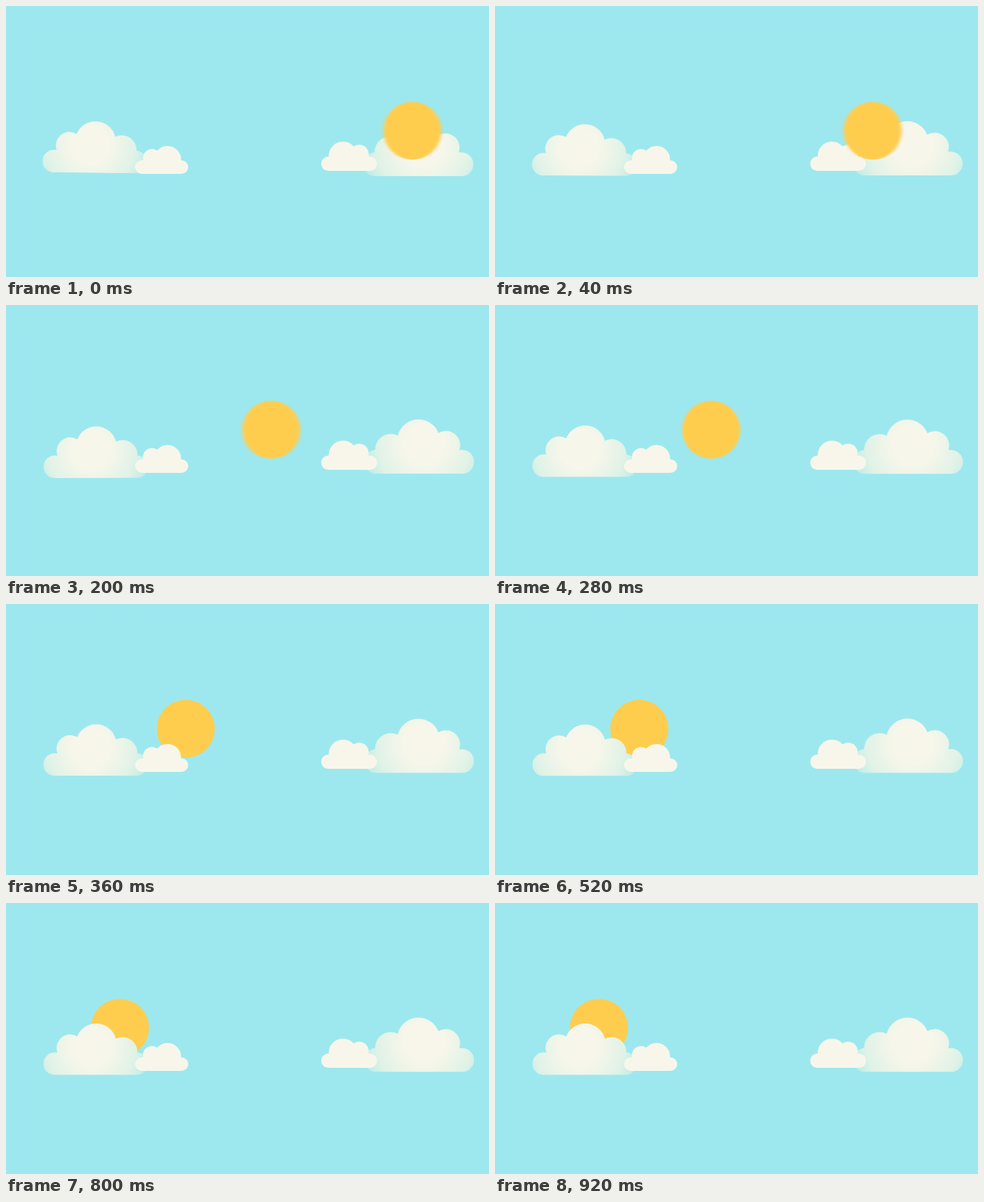
Write an HTML page that moves like this. It is 640 px wide and 360 px high and loops after 960 ms.

```html
<!DOCTYPE html>
<html lang="en">
<head>
<meta charset="utf-8">
<title>Sun and clouds</title>
<style>
  html, body { margin: 0; width: 100%; height: 100%; overflow: hidden; background: #9de8ee; }
  svg { display: block; width: 100%; height: 100%; }
</style>
</head>
<body>
<svg viewBox="0 0 640 360">
  <defs>
    <radialGradient id="puff" gradientUnits="userSpaceOnUse" cx="-7" cy="-37" r="85">
      <stop offset="0" stop-color="#f8f6ea"/>
      <stop offset=".3" stop-color="#f7f6ea"/>
      <stop offset=".7" stop-color="#e0f2e7"/>
      <stop offset="1" stop-color="#b0ebe9"/>
    </radialGradient>
    <clipPath id="bigShape">
      <circle cx="-55" cy="-15" r="15"/>
      <circle cx="-34.5" cy="-36" r="18"/>
      <circle cy="-41.5" r="27"/>
      <circle cx="35" cy="-30.7" r="19.6"/>
      <circle cx="53.5" cy="-15" r="15"/>
      <rect x="-55" y="-30" width="108.5" height="30"/>
    </clipPath>
    <rect id="big" x="-72" y="-70" width="144" height="72" fill="url(#puff)" clip-path="url(#bigShape)"/>
    <g id="small" fill="#f8f6ea">
      <circle cx="-34" cy="-9" r="9"/>
      <circle cx="-20.5" cy="-21" r="12"/>
      <circle cy="-19" r="18"/>
      <circle cx="18.5" cy="-9" r="9"/>
      <rect x="-34" y="-18" width="52.5" height="18"/>
    </g>
    <filter id="smear" filterUnits="userSpaceOnUse" x="-60" y="-50" width="120" height="100" color-interpolation-filters="sRGB">
      <feGaussianBlur id="blur" stdDeviation="0 0"/>
    </filter>
  </defs>
  <rect width="640" height="360" fill="#9de8ee"/>
  <use id="bigRight" href="#big"/>
  <use href="#small" transform="translate(446.5 219) scale(-1.05 1.05)"/>
  <g id="sun"><circle r="38.5" fill="#ffcd4e"/></g>
  <use id="bigLeft" href="#big"/>
  <use href="#small" transform="translate(214 223)"/>
</svg>
<script>
  const LOOP = 960, STEP = 40;
  // Sun track: step, x, speed in px per step
  const track = [
    [0, 538.5, -38.2], [3, 424.5, -37.6], [5, 351.5, -35], [9, 238.2, -18.5],
    [13, 191.3, -7.6], [17, 166, -5.4], [23, 137.8, -4.2]
  ];
  const $ = id => document.getElementById(id);
  const sun = $('sun'), blur = $('blur'), bigLeft = $('bigLeft'), bigRight = $('bigRight');

  function sunAt(s) {
    let i = 0;
    while (i < track.length - 2 && s >= track[i + 1][0]) i++;
    const [s0, x0, v0] = track[i], [s1, x1, v1] = track[i + 1];
    const d = s1 - s0, u = (s - s0) / d, w = 1 - u;
    return w * w * (1 + 2 * u) * x0 + u * w * w * d * v0
         + u * u * (3 - 2 * u) * x1 - u * u * w * d * v1;
  }

  // Damped swing of the large clouds
  const swing = t => t > 560 ? 0 : -7.3 * Math.exp(-.0085 * t) * Math.cos(.015 * t + .37);

  function draw(t) {
    const s = t / STEP, x = sunAt(s);
    const speed = s ? sunAt(s - 1) - x : 38;
    const sd = Math.min(2.3, Math.max(0, (speed - 22) * .16));
    sun.setAttribute('transform', `translate(${x} 165.8)`);
    if (sd) {
      blur.setAttribute('stdDeviation', `${sd} 0`);
      sun.setAttribute('filter', 'url(#smear)');
    } else {
      sun.removeAttribute('filter');
    }
    const dy = swing(t);
    bigLeft.setAttribute('transform', `translate(${119.5 + dy * .2} ${228.5 + dy}) rotate(${-dy * .09})`);
    bigRight.setAttribute('transform', `translate(${546.5 + dy * .11} ${224.4 - dy * .25}) scale(-1.052 1.052)`);
  }

  const start = performance.now();
  function tick() {
    const t = (performance.now() - start) % LOOP;
    draw(Math.floor(t / STEP) * STEP);
    requestAnimationFrame(tick);
  }
  tick();
</script>
</body>
</html>
```
